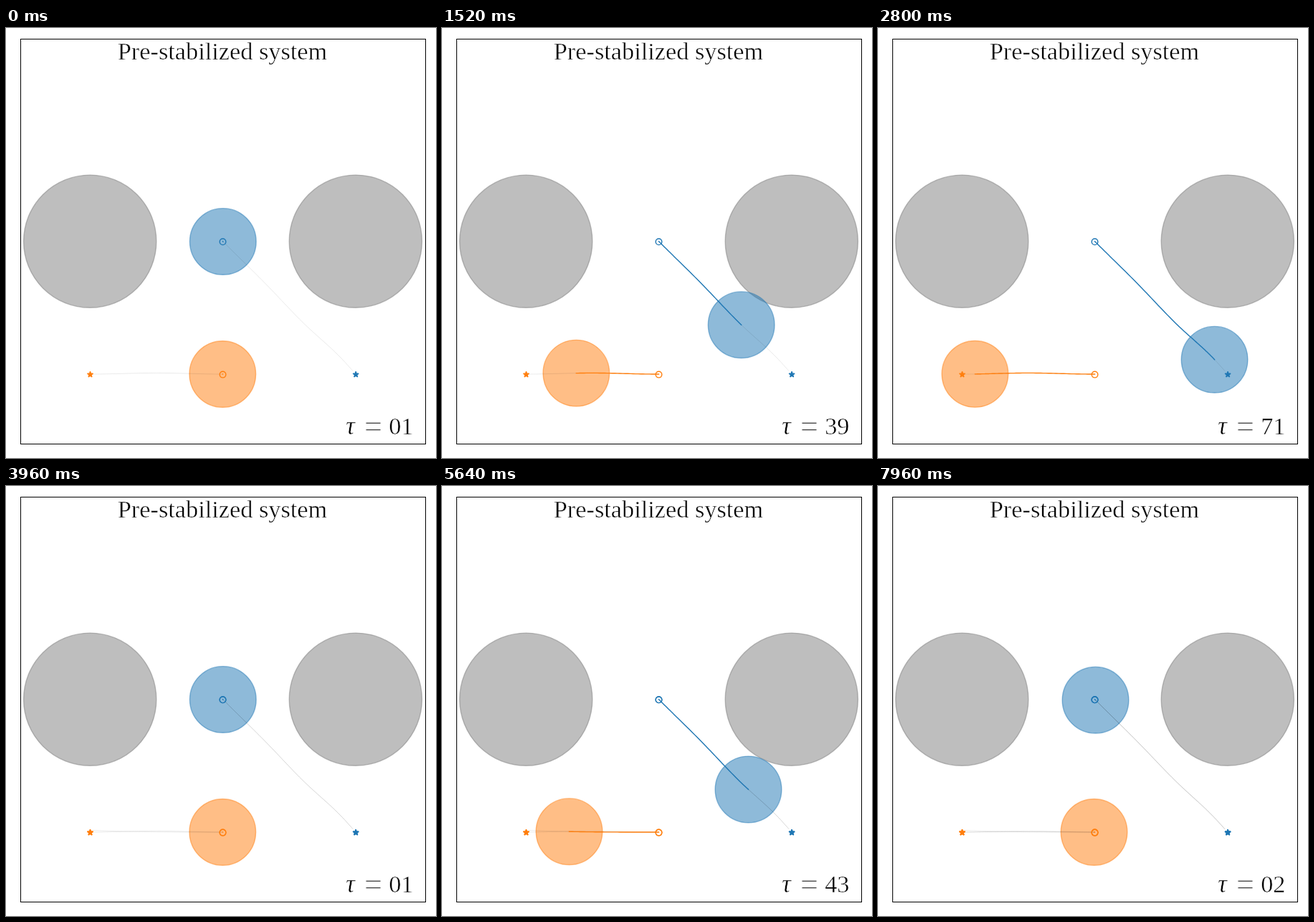
These frames come from a looping animation (600 by 600 pixels, 8 s). An HTML page:

```html
<!DOCTYPE html>
<html lang="en">
<head>
<meta charset="utf-8">
<title>Pre-stabilized system</title>
<style>
  html, body { margin: 0; width: 100%; height: 100%; overflow: hidden; background: #fff; }
  svg { display: block; width: 100vw; height: 100vh; }
  /* the white outline thins the letters */
  text { font-family: "Liberation Serif", serif; font-size: 34.3px; stroke: #fff; stroke-width: .55; }
  .tau { font-size: 36px; font-style: italic; }
  .equals { font-size: 46px; stroke-width: 1.4; }
  .disk { fill-opacity: .5; stroke-opacity: .5; stroke-width: 1.39; }
  .trail { fill: none; stroke-width: 1.39; stroke-linecap: square; stroke-linejoin: round; }
  .plan { fill: none; stroke: #000; stroke-opacity: .085; }
  .ring { fill: none; stroke-width: 1.4; }
  .star { stroke-width: 1.3; stroke-linejoin: bevel; }
</style>
</head>
<body>
<svg viewBox="0 0 600 600">
  <g id="disks"></g>
  <g id="runs"></g>
  <g id="trails"></g>
  <rect x="20.5" y="15.5" width="565" height="565" fill="none" stroke="#000"/>
  <text x="302" y="43.5" text-anchor="middle">Pre-stabilized system</text>
  <text class="tau" x="474" y="567">τ</text>
  <text class="equals" x="499.5" y="571">=</text>
  <text id="count" x="568.5" y="567" text-anchor="end">01</text>
</svg>
<script>
const STEP = 40, RUN_STEPS = 99, LOOP_STEPS = 200;
const UNIT = 185.3, CENTER = 302.5, MIDDLE = 297.7;
const { sin, cos, exp, PI } = Math;
const $ = id => document.getElementById(id);

function add(parent, tag, attrs) {
  const node = document.createElementNS('http://www.w3.org/2000/svg', tag);
  for (const key in attrs) node.setAttribute(key, attrs[key]);
  return parent.appendChild(node);
}

const addDisk = (color, r, cx, cy) =>
  add($('disks'), 'circle', { class: 'disk', r, cx, cy, fill: color, stroke: color });

// Critically damped approach from 0 to just past 1
function travel(tick) {
  const x = .0532 * tick;
  return 1.0125 * (1 - (1 + x) * exp(-x));
}

// Vertical drift of each run, by share u of the way
const weave = size => u => -size * u * sin(3 * PI * u ** 1.2);
const bodies = [
  { color: '#1f77b4', y: MIDDLE, dx: 1, dy: 1,
    drifts: [weave(2.6), weave(2.6), weave(1.2)] },
  { color: '#ff7f0e', y: MIDDLE + UNIT, dx: -1, dy: 0,
    drifts: [u => -1.6 * sin(PI * u) ** 2, u => -2.6 * u ** 3, u => -.5 * sin(PI * u)] }
];

const trace = ({ y, dx, dy }, drift) => Array.from({ length: RUN_STEPS + 1 }, (_, tick) => {
  const u = travel(tick);
  return [CENTER + dx * UNIT * u, y + dy * UNIT * u + drift(u)];
});

const line = points => points.map(p => p.map(n => n.toFixed(2)).join()).join(' ');

const starPoints = (cx, cy) => line(Array.from({ length: 10 }, (_, i) => {
  const r = i % 2 ? 1.6 : 4.2, a = PI * i / 5;
  return [cx + r * sin(a), cy - r * cos(a)];
}));

for (const side of [-1, 1]) addDisk('#7f7f7f', 92.6, CENTER + side * UNIT, MIDDLE);

const layers = bodies[0].drifts.map(() => add($('runs'), 'g', {}));

for (const body of bodies) {
  const { color, y, dx, dy } = body;
  body.paths = body.drifts.map(drift => trace(body, drift));
  body.disk = addDisk(color, 46.3, CENTER, y);
  body.trail = add($('trails'), 'polyline', { class: 'trail', stroke: color });
  // Every run draws its plan and markers over the earlier ones
  layers.forEach((layer, i) => {
    add(layer, 'polyline', { class: 'plan', points: line(body.paths[i]) });
    add(layer, 'circle', { class: 'ring', cx: CENTER, cy: y + .6, r: 4.3, stroke: color });
    add(layer, 'polygon', { class: 'star', fill: color, stroke: color,
      points: starPoints(CENTER + dx * UNIT + .3, y + dy * UNIT + .5) });
  });
}

function draw() {
  const step = Math.floor(performance.now() / STEP) % LOOP_STEPS;
  const run = Math.floor(step / RUN_STEPS), tick = step % RUN_STEPS + 1;
  layers.forEach((layer, i) => layer.style.display = i <= run ? '' : 'none');
  for (const { paths, disk, trail } of bodies) {
    const [x, y] = paths[run][tick];
    disk.setAttribute('cx', x);
    disk.setAttribute('cy', y);
    trail.setAttribute('points', line(paths[run].slice(0, tick + 1)));
  }
  $('count').textContent = String(tick).padStart(2, '0');
  requestAnimationFrame(draw);
}
draw();
</script>
</body>
</html>
```
